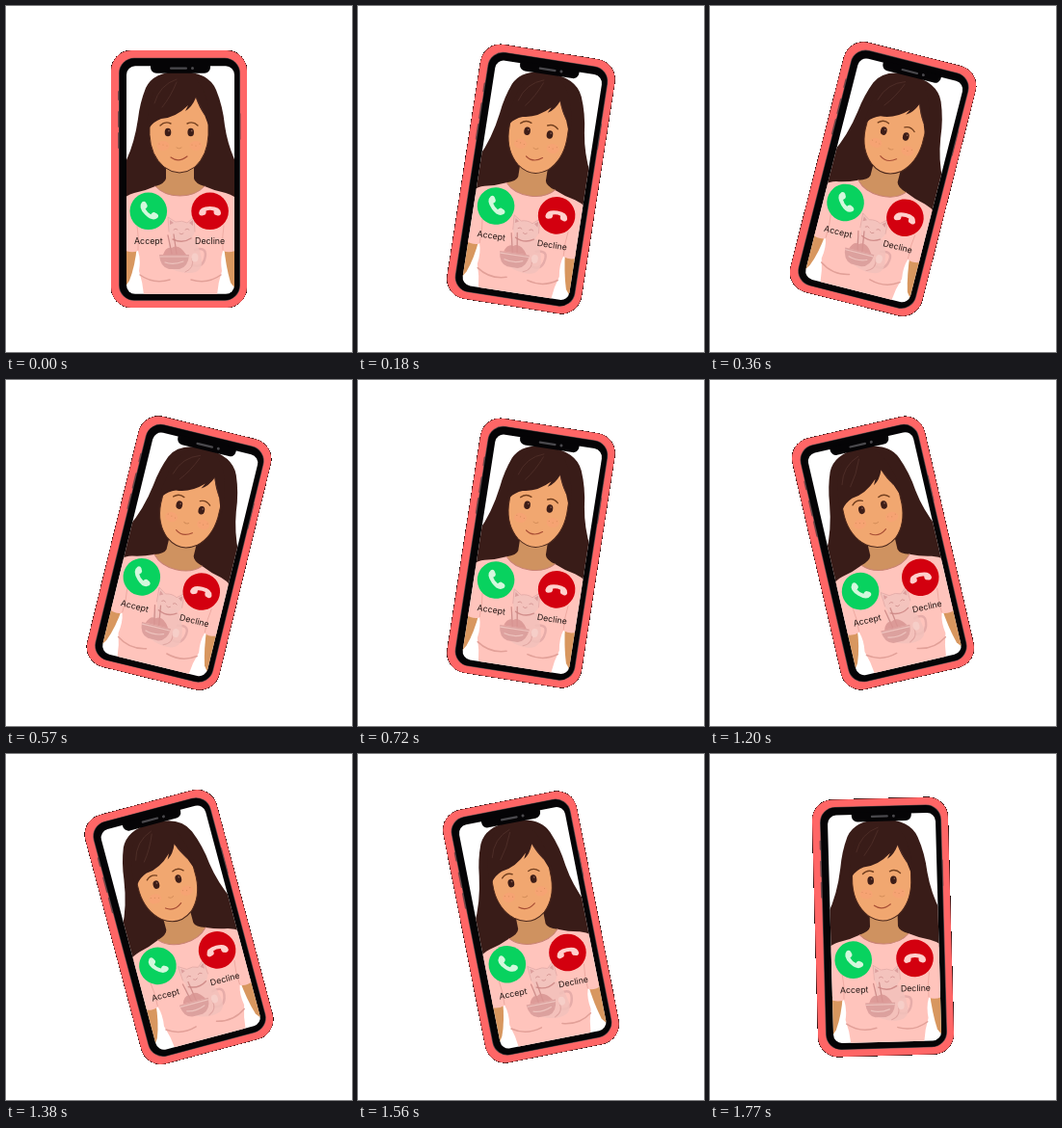
An HTML page with a canvas that plays this animation: 359 by 359 pixels, repeating every 1.8 s.

```html
<!DOCTYPE html>
<html lang="en">
<head>
<meta charset="utf-8">
<title>Incoming call</title>
<style>
html, body { margin: 0; width: 100%; height: 100%; overflow: hidden; background: #fff; }
canvas { display: block; width: 359px; height: 359px; }
</style>
</head>
<body>
<canvas id="stage" width="359" height="359"></canvas>
<script>
const SIZE = 359, LOOP = 1800, STEP = 30, SWING = 15;
const ctx = document.getElementById('stage').getContext('2d', { willReadFrequently: true });

function fill(path, color) {
  ctx.fillStyle = color;
  ctx.fill(new Path2D(path));
}

function line(path, color, width = 1) {
  ctx.strokeStyle = color;
  ctx.lineWidth = width;
  ctx.lineCap = 'round';
  ctx.stroke(new Path2D(path));
}

function box(x, y, w, h, r, color) {
  ctx.beginPath();
  ctx.roundRect(x, y, w, h, r);
  ctx.fillStyle = color;
  ctx.fill();
}

function oval(x, y, rx, ry, color) {
  ctx.beginPath();
  ctx.ellipse(x, y, rx, ry, 0, 0, 2 * Math.PI);
  ctx.fillStyle = color;
  ctx.fill();
}

function drawBody() {
  // Arms
  fill('M122 248H136Q134 270 128 285L122 294Z', '#d8975f');
  fill('M240 248H226Q228 270 233 287L240 296Z', '#d8975f');
  // Shirt
  fill('M155 187Q144 192 133 194Q126 196 122 200V253Q130 257 137 254Q140 263 138 275Q142 287 143 300H219Q220 287 224 275Q222 263 225 254Q232 257 240 253V200Q235 196 228 194Q217 192 206 187Z', '#ffc4bc');
  line('M137 253Q138 239 136 228M225 253Q224 239 226 228', '#eba59d', .8);
  line('M139 279Q153 289 170 284M192 284Q209 289 223 279', '#e2a098', 1.5);
  // Neck
  fill('M166 160H195V179Q196 184 206 187Q197 197 180.5 197Q164 197 155 187Q165 184 166 179Z', '#cf9260');
  line('M155 187Q164 197 180.5 197Q197 197 206 187', '#c98274', 1);
}

function drawCat() {
  ctx.globalAlpha = .85;
  line('M196 253Q210 249 206 263Q203 272 194 269', '#e2a9a6', 2.5);
  fill('M171 238Q166 254 168 270Q176 277 190 277Q204 277 203 264Q201 246 191 237Z', '#f2c1bb');
  fill('M169 234L168 219L176 224Q183 222 188 225L195 219L196 234Q194 243 182 243Q171 243 169 234Z', '#f3c3be');
  line('M169 234L168 219L176 224Q183 222 188 225L195 219L196 234', '#e0a6a3', .8);
  fill('M170 227V222L174 225ZM190 225L194 222V228Z', '#d99998');
  line('M174 232Q176 230 178 232M186 232Q188 230 190 232M180 236Q182 238 184 236', '#c98786', .8);
  line('M173 242Q183 247 192 241', '#cc8583', 1.4);
  line('M186 276Q196 272 193 262', '#dda19e', 1);
  line('M172 257L168 238M177 257L174 237', '#c98583', 1.3);
  fill('M163 258Q166 249 172 251Q179 246 187 258Z', '#d99592');
  fill('M159 258H190Q189 271 180 273H169Q160 271 159 258Z', '#d99c99');
  line('M160 260H189M165 266Q174 269 184 265', '#f1c9c4', 1.2);
  oval(196, 261, 3.5, 4.5, '#f7d0ca');
  ctx.globalAlpha = 1;
}

function drawHead() {
  const face = 'M149 112Q149 92 180 91Q210 92 210 113V134Q209 155 196 167Q180 179 164 167Q150 155 149 134Z';
  fill(face, '#f1a770');
  line(face, '#4b271b', 1);
  oval(163, 145, 6.5, 5, '#f6a373');
  oval(197, 145, 6.5, 5, '#f6a373');
  for (const x of [159, 163, 167, 193, 197, 201])
    oval(x, 143 + x % 3, .6, .6, '#d98e5c');
  for (const x of [168, 191.7]) {
    oval(x, 131, 3.3, 4.3, '#3d1d17');
    oval(x + 1, 129.4, .8, .9, '#8b5d4d');
  }
  line('M160 124Q165 119 171 122M188 122Q194 119 199 124', '#74401f', 1.4);
  line('M177 147Q179.5 149 182 147', '#d58e5a', 1);
  line('M171 157Q179 163 188 156', '#a84e35', 1.2);
  // Fringe
  fill('M146 128Q148 70 180 68Q210 70 213 130Q209 122 206 113Q200 105 197 95Q193 105 186 109L189 103Q176 116 161 117Q153 120 149 126Z', '#391c18');
  line('M154 101Q159 82 177 76M162 105Q171 94 177 79', '#51302a', .8);
  line('M197 95Q202 105 206 113', '#51302a', .7);
}

function drawWoman() {
  // Hair behind the shoulders
  fill('M180 68Q153 68 145 85Q139 100 137 117Q133 145 122 166V202H240V166Q230 145 227 124Q225 104 218 87Q210 68 180 68Z', '#391c18');
  drawBody();
  drawCat();
  drawHead();
}

function drawButton(x, color, icon, turn, label) {
  oval(x, 212.8, 19.3, 19.3, color);
  ctx.save();
  ctx.translate(x, 213);
  ctx.rotate(turn);
  fill('M-11.5 2Q-11 -5 0 -5Q11 -5 11.5 2Q11 5 8 4.5L5 3.5Q3.5 2.5 4 -.5Q0 -1.8 -4 -.5Q-3.5 2.5 -5 3.5L-8 4.5Q-11 5 -11.5 2Z', icon);
  ctx.restore();
  ctx.fillStyle = '#221715';
  ctx.font = '8.8px Inter, "Open Sans", sans-serif';
  ctx.textAlign = 'center';
  ctx.fillText(label, x, 247);
}

function drawPhone() {
  box(109, 46, 141, 267, 21, '#ff6666');
  box(116, 88, 2, 10, 1, '#7c4548');
  box(116, 109, 2, 17, 1, '#7c4548');
  box(116, 131, 2, 17, 1, '#7c4548');
  box(241.5, 111, 2, 28, 1, '#7c4548');
  box(117, 53.7, 126, 252, 16, '#55494b');
  box(117.7, 54.2, 124.6, 251, 15.5, '#050406');
  ctx.save();
  ctx.beginPath();
  ctx.roundRect(125, 62.3, 112, 236.5, 9);
  ctx.clip();
  ctx.fillStyle = '#fff';
  ctx.fillRect(120, 58, 122, 245);
  drawWoman();
  drawButton(147.8, '#08d25f', '#d3f8dd', -Math.PI * .75, 'Accept');
  drawButton(211.6, '#d3000f', '#ffd0cc', 0, 'Decline');
  ctx.restore();
  box(150, 60, 62, 9.7, [0, 0, 6, 6], '#050406');
  box(170, 63.5, 18, 2.2, 1, '#4a494d');
  oval(193.5, 64.6, 1.5, 1.5, '#4a494d');
}

// Hard-edged cutout: partly covered edge pixels darken instead of fading.
function hardenEdge() {
  const image = ctx.getImageData(0, 0, SIZE, SIZE), d = image.data;
  for (let i = 0; i < d.length; i += 4) {
    const a = d[i + 3];
    if (a === 0 || a === 255) continue;
    for (let c = 0; c < 3; c++) d[i + c] *= a / 255;
    d[i + 3] = a < 35 ? 0 : 255;
  }
  ctx.putImageData(image, 0, 0);
}

function draw(time) {
  const angle = SWING * Math.sin(2 * Math.PI * time / LOOP) * Math.PI / 180;
  const mid = SIZE / 2;
  ctx.clearRect(0, 0, SIZE, SIZE);
  ctx.save();
  ctx.translate(mid, mid);
  ctx.rotate(angle);
  ctx.translate(-mid, -mid);
  drawPhone();
  ctx.restore();
  hardenEdge();
}

const start = performance.now();
let shown = -1;

function tick() {
  const time = Math.floor((performance.now() - start) % LOOP / STEP) * STEP;
  if (time !== shown) draw(shown = time);
  requestAnimationFrame(tick);
}
tick();
</script>
</body>
</html>
```
